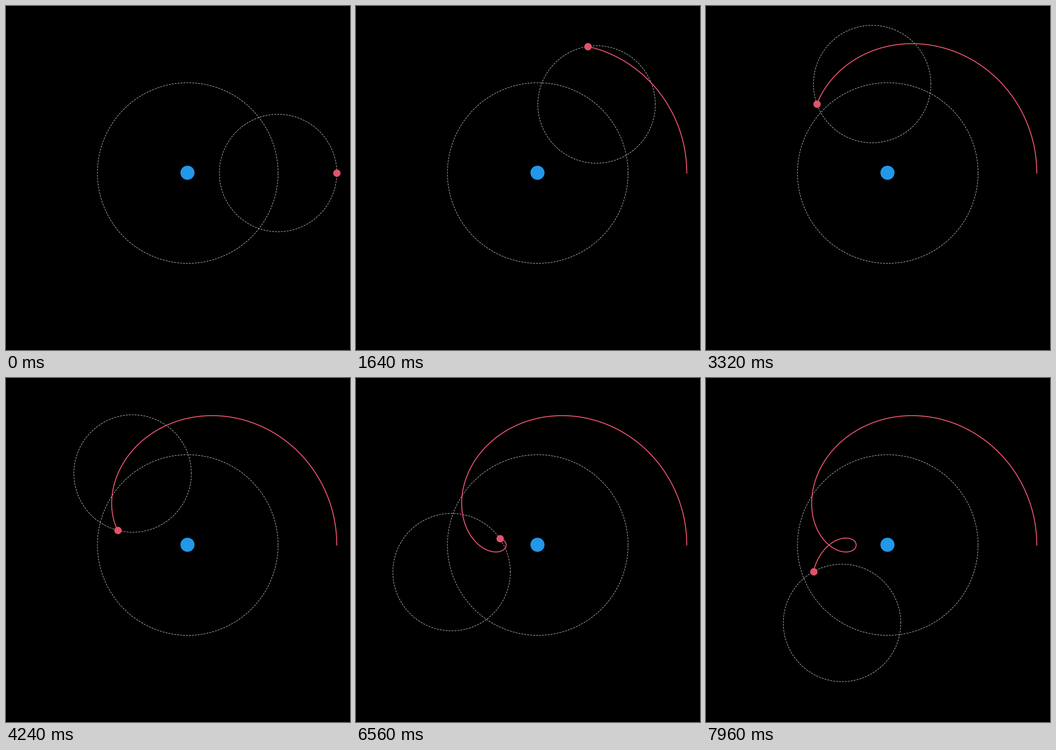
Recreate the animation shown at these times as a matplotlib script. Size 748 by 748 pixels, loop 8 s.

```python
import numpy as np
import matplotlib.pyplot as plt
from matplotlib.animation import FuncAnimation
from matplotlib.patches import Circle

SIZE, DPI = 748, 100
PX = 72 / DPI  # points per pixel
FRAMES, INTERVAL = 200, 40
CX, CY = 395.2, 363.2
R, r = 196.4, 127.7

# One full turn of the deferent takes 300 samples; the epicycle runs twice as fast.
theta = np.linspace(0, 2 * np.pi, 300)


def circle(cx, cy, radius):
    return cx + radius * np.cos(theta), cy - radius * np.sin(theta)


hub_x, hub_y = circle(CX, CY, R)
planet_x = hub_x + r * np.cos(2 * theta)
planet_y = hub_y - r * np.sin(2 * theta)

fig = plt.figure(figsize=(SIZE / DPI, SIZE / DPI), dpi=DPI, facecolor="black")
ax = fig.add_axes([0, 0, 1, 1])
ax.set_xlim(0, SIZE)
ax.set_ylim(SIZE, 0)
ax.axis("off")

orbit = dict(color="white", ls=(0, (5.2, 2.8)), lw=0.8 * PX)
ax.plot(*circle(CX, CY, R), **orbit)
epicycle, = ax.plot([], [], **orbit)
trail, = ax.plot([], [], color="#ec5470", lw=2 * PX)
ax.add_patch(Circle((CX - 0.6, CY - 0.6), 15.3, color="#2397e8", lw=0, zorder=4))
planet, = ax.plot([], [], "o", color="#e1536b", ms=16 * PX, mew=0, zorder=5)


def update(i):
    epicycle.set_data(*circle(hub_x[i], hub_y[i], r))
    trail.set_data(planet_x[:i + 1], planet_y[:i + 1])
    planet.set_data([planet_x[i]], [planet_y[i]])
    return epicycle, trail, planet


anim = FuncAnimation(fig, update, frames=FRAMES, interval=INTERVAL,
                     init_func=lambda: update(0), repeat=True, repeat_delay=0)
plt.show()
```
